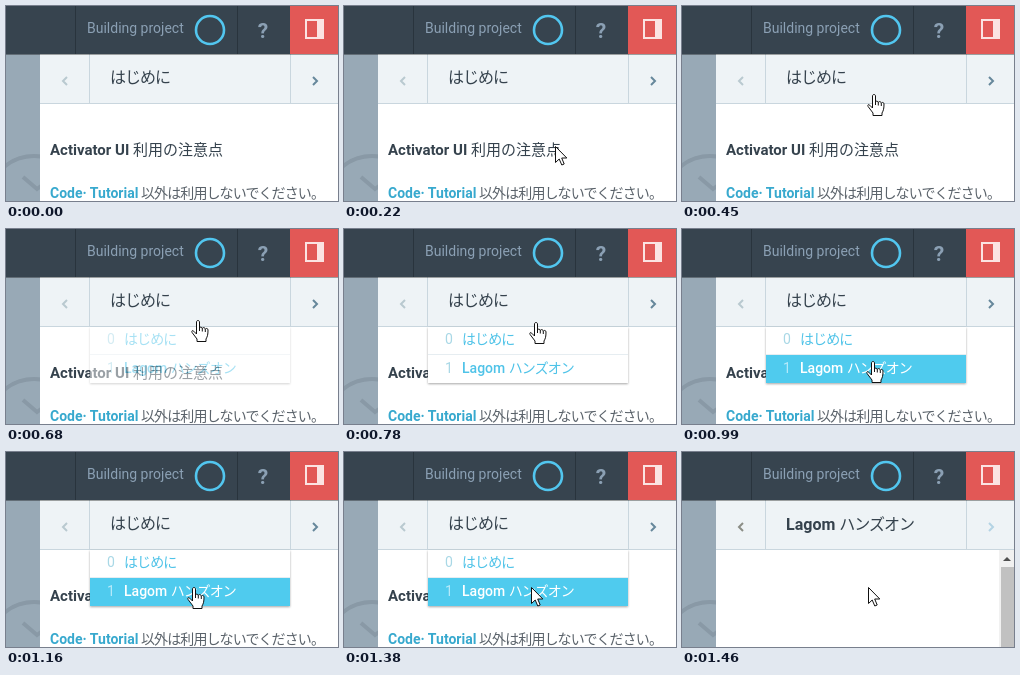
An HTML page that plays this animation: 332x195 px, repeating every 2200 ms.

```html
<!DOCTYPE html>
<html lang="ja">
<head>
<meta charset="utf-8">
<title>Tutorial menu</title>
<style>
html, body { margin: 0; width: 100%; height: 100%; overflow: hidden; background: #fff; }
svg { display: block; width: 332px; height: 195px; }
text { font: 14px Roboto, "Noto Sans CJK JP", "Noto Sans CJK", sans-serif; fill: #35424d; white-space: pre; }
.jp { letter-spacing: -.9px; }
.title { font-size: 16px; }
.title .jp { letter-spacing: -1px; }
.head { font-size: 15px; }
.b { font-weight: 700; }
.m { font-weight: 500; }
.bar { fill: #8ba0b4; }
.item { --bg: #fff; --ink: #4fc3e8; --no: #a9d8e6; }
.on { --bg: #4fcbee; --ink: #fff; --no: #b5e9f9; }
.bg { fill: var(--bg); }
.ink { fill: var(--ink); }
.no { fill: var(--no); }
.chev { fill: none; stroke-width: 2; }
.cur { fill: #fff; stroke: #111; stroke-linejoin: round; }
.anim { animation: 2.2s step-end infinite; }
#cursor { animation-name: move; }
#arrow { animation-name: arrow; }
#hand { animation-name: hand; }
#menu { animation-name: menu; }
#row0 { animation-name: row0; }
#row1 { animation-name: row1; }
#first { animation-name: first; }
#second { animation-name: second; }
@keyframes move {
  0% { transform: translate(221px, 200px); }
  6.818% { transform: translate(220px, 163px); }
  10% { transform: translate(211px, 140px); }
  13.636% { transform: translate(201px, 117px); }
  17.273% { transform: translate(194px, 100px); }
  20.455% { transform: translate(191px, 88px); }
  30.909% { transform: translate(191px, 91px); }
  35.455% { transform: translate(191px, 93px); }
  37.727% { transform: translate(190px, 105px); }
  41.364% { transform: translate(190px, 118px); }
  45% { transform: translate(190px, 132px); }
  48.182% { transform: translate(189px, 134px); }
  52.727% { transform: translate(187px, 135px); }
  66.364%, 100% { transform: translate(186px, 135px); }
}
@keyframes arrow { 0%, 62.727%, 100% { opacity: 1; } 20.455% { opacity: 0; } }
@keyframes hand { 0%, 62.727%, 100% { opacity: 0; } 20.455% { opacity: 1; } }
@keyframes menu { 0%, 66.364%, 100% { opacity: 0; } 30.909% { opacity: .5; } 35.455% { opacity: 1; } }
@keyframes row0 { 0%, 45%, 100% { opacity: 0; } 37.727% { opacity: 1; } }
@keyframes row1 { 0%, 100% { opacity: 0; } 45% { opacity: 1; } }
@keyframes first { 0% { opacity: 1; } 66.364%, 100% { opacity: 0; } }
@keyframes second { 0% { opacity: 0; } 66.364%, 100% { opacity: 1; } }
</style>
</head>
<body>
<svg viewBox="0 0 332 195">
  <defs>
    <filter id="shade" x="-10%" y="-10%" width="120%" height="130%">
      <feDropShadow dx="0" dy="1" stdDeviation="1.2" flood-color="#000" flood-opacity=".35"/>
    </filter>
    <g id="item0">
      <rect class="bg" x="84" y="98" width="200" height="28"/>
      <text class="no" x="101" y="115">0</text>
      <text class="ink jp" x="118" y="115">はじめに</text>
    </g>
    <g id="item1">
      <rect class="bg" x="84" y="126" width="200" height="28"/>
      <text class="no" x="101" y="144">1</text>
      <text class="ink" x="118" y="144"><tspan class="m">Lagom </tspan><tspan class="jp">ハンズオン</tspan></text>
    </g>
  </defs>

  <!-- side panel -->
  <path fill="#98a9b6" d="M0 48H34V195H0Z"/>
  <g fill="none" stroke="#8999a6" stroke-width="4">
    <circle cx="28" cy="196" r="46"/>
    <path d="M17 171L31 183L43 174"/>
  </g>
  <path fill="#fff" d="M34 48H332V195H34Z"/>

  <!-- page header -->
  <path fill="#eef3f6" d="M34 48H332V97H34Z"/>
  <path fill="#c9d6de" d="M34 97H332v1H34ZM83 48h1v49h-1ZM284 48h1v49h-1Z"/>

  <!-- top bar -->
  <path fill="#37444f" d="M0 0H332V48H0Z"/>
  <path fill="#29343d" d="M69 0h1v48h-1ZM231 0h1v48h-1Z"/>
  <text class="bar" x="81" y="27">Building project</text>
  <circle cx="204" cy="24" r="14" fill="none" stroke="#52c6ef" stroke-width="2.6"/>
  <text class="bar b" x="257" y="32" text-anchor="middle" style="font-size:21px">?</text>
  <path fill="#e25856" d="M284 0H332V48H284Z"/>
  <path fill="#fbe3e2" fill-rule="evenodd" d="M299 13H318V33H299ZM301 15V31H311V15Z"/>
  <path fill="#000" opacity=".35" d="M0 48H332v1H0Z"/>

  <g id="first" class="anim">
    <path class="chev" stroke="#b9c9d0" d="M61 71L57 75L61 79"/>
    <path class="chev" stroke="#66879b" d="M307 71L311 75L307 79"/>
    <text class="title" x="104" y="77"><tspan class="jp">はじめに</tspan></text>
    <text class="head" x="44" y="149"><tspan class="b">Activator UI </tspan><tspan class="m">利用の注意点</tspan></text>
    <text class="b" x="44" y="192" style="fill:#38a9ce">Code· Tutorial</text>
    <text class="jp" x="135" y="192" style="fill:#5a626a">以外は<tspan class="m">利用しないでください。</tspan></text>
  </g>

  <g id="second" class="anim">
    <path class="chev" stroke="#8b8d86" d="M61 71L57 75L61 79"/>
    <path class="chev" stroke="#b4d3e4" d="M307 71L311 75L307 79"/>
    <text class="title" x="104" y="78"><tspan class="b">Lagom </tspan><tspan class="jp">ハンズオン</tspan></text>
    <path fill="#f1f1f1" d="M317 98H332V195H317Z"/>
    <path fill="#505050" d="M321 109L325 105L329 109Z"/>
    <path fill="#c1c1c1" d="M319 115H332V195H319Z"/>
  </g>

  <g id="menu" class="anim">
    <path fill="#fff" filter="url(#shade)" d="M84 98H284V154H84Z"/>
    <use href="#item0" class="item"/>
    <use href="#item1" class="item"/>
    <path fill="#e6edf1" d="M84 125H284v1H84Z"/>
    <g id="row0" class="anim"><use href="#item0" class="item on"/></g>
    <g id="row1" class="anim"><use href="#item1" class="item on"/></g>
  </g>

  <g id="cursor" class="anim">
    <path id="arrow" class="cur anim" d="M.5 .5V16.5L4.2 13L6.8 19L9.2 18L6.7 12H11.8Z"/>
    <g id="hand" class="anim">
      <path class="cur" transform="translate(-5.5 0)" d="M5 14L2.2 11.2C.5 9.5-.2 11.6.8 12.8L5.5 19V21.5H14.5V19C16 16.5 16.5 14.5 16.5 10C16.5 8 14 8 13.8 9.5C13.8 7.3 11 7 10.8 8.6C10.6 6.8 8 6.8 8 8V2C8 0 5 0 5 2Z"/>
      <path class="cur" d="M2.5 8V11M5.3 8.6V11.5M8.3 9.5V12"/>
    </g>
  </g>
</svg>
</body>
</html>
```
